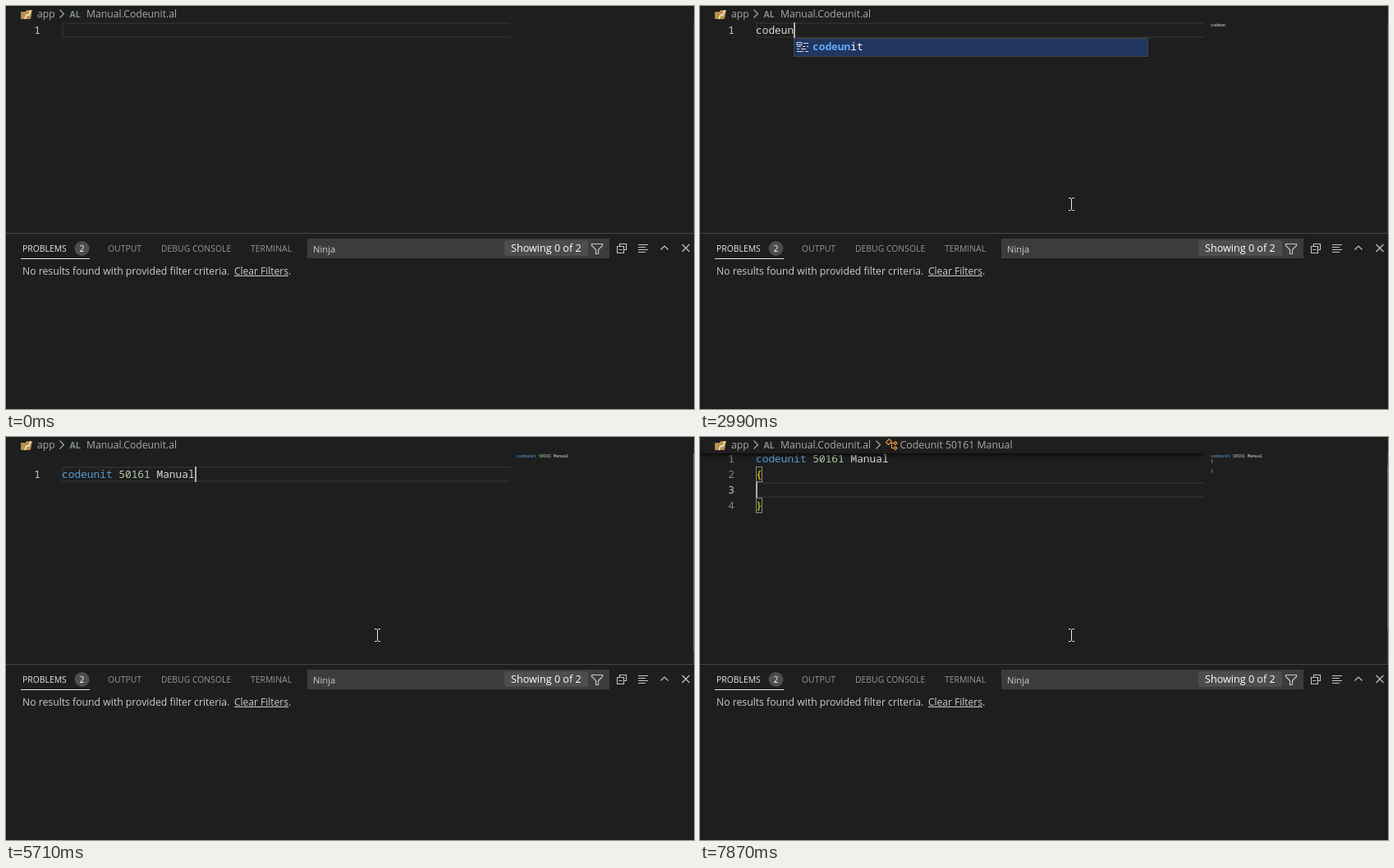
Write an HTML page with a canvas that moves like this. It is 838 px wide and 492 px high and loops after 8000 ms.

```html
<!DOCTYPE html>
<html lang="en">
<head>
<meta charset="utf-8">
<title>Typing a codeunit</title>
<style>
html, body { margin: 0; width: 838px; height: 492px; overflow: hidden; background: #1e1e1e; }
canvas { display: block; }
</style>
</head>
<body>
<canvas id="stage" width="838" height="492"></canvas>
<script>
const ctx = document.getElementById('stage').getContext('2d');
const LOOP = 8000, LEFT = 68, CHAR = 7.698, ROW = 19, TOP = 20, VIEW = 257;
const MONO = '"Noto Sans Mono", "DejaVu Sans Mono", monospace';
const SANS = '"Open Sans", "Noto Sans", sans-serif';
const CODE_FONT = `12.83px ${MONO}`;

const CODE = 'codeunit 50161 Manual';
const KEY_TIMES = [2390, 2490, 2590, 2690, 2790, 2990, 3080, 3170, 3260, 3460, 3520,
  3780, 3980, 4050, 4580, 4930, 5110, 5260, 5260, 5450, 5710];
const LENS = 5710, SPACE = 5980, BRACE = 6200, ENTER = 6400, REFORMAT = 7870;

const between = (t, a, b) => t >= a && t < b;

function rect(x, y, w, h, color) {
  ctx.fillStyle = color;
  ctx.fillRect(x, y, w, h);
}

function text(s, x, y, color, font) {
  ctx.fillStyle = color;
  ctx.font = font;
  ctx.fillText(s, x, y);
}

const label = (s, x, y, color, size = 12.2) => text(s, x, y, color, `${size}px ${SANS}`);

function disc(x, y, r, color) {
  ctx.fillStyle = color;
  ctx.beginPath();
  ctx.arc(x, y, r, 0, 7);
  ctx.fill();
}

function path(d, color, width = 1, fill) {
  const p = new Path2D(d);
  if (fill) { ctx.fillStyle = fill; ctx.fill(p); }
  ctx.strokeStyle = color;
  ctx.lineWidth = width;
  ctx.stroke(p);
}

function editorState(t) {
  const count = KEY_TIMES.filter(k => t >= k).length;
  if (t >= REFORMAT) return { lines: [CODE, '{', '', '}'], row: 2, col: 0 };
  if (t >= ENTER) return { lines: [CODE + ' {', '', '}'], row: 1, col: 4 };
  if (t >= BRACE) return { lines: [CODE + ' {}'], row: 0, col: CODE.length + 2 };
  if (t >= SPACE) return { lines: [CODE + ' '], row: 0, col: CODE.length + 1 };
  return { lines: [CODE.slice(0, count)], row: 0, col: count };
}

function tokenColor(word) {
  if (word === 'codeunit') return '#569cd6';
  if (/\d/.test(word)) return '#b5cea8';
  return /[{}]/.test(word) ? '#ffd700' : '#d4d4d4';
}

function eachToken(line, draw) {
  for (const m of line.matchAll(/codeunit|\d+|[{}]|[^{}\d\s]+/g)) draw(m[0], m.index, tokenColor(m[0]));
}

function drawEditor(t) {
  const { lines, row, col } = editorState(t);
  const lens = t >= LENS ? 16 : 0;
  const scroll = t >= REFORMAT ? ROW : 0;
  const lineTop = i => TOP + lens - scroll + i * ROW;

  ctx.save();
  ctx.beginPath();
  ctx.rect(0, TOP, 838, VIEW);
  ctx.clip();

  ctx.strokeStyle = '#2b2b2b';
  ctx.lineWidth = 2;
  ctx.beginPath();
  ctx.moveTo(614, lineTop(row) + 1);
  ctx.lineTo(LEFT + 1, lineTop(row) + 1);
  ctx.lineTo(LEFT + 1, lineTop(row) + ROW - 1);
  ctx.lineTo(614, lineTop(row) + ROW - 1);
  ctx.stroke();

  lines.forEach((line, i) => {
    const y = lineTop(i);
    text(i + 1, 34.3, y + 14, i === row ? '#c6c6c6' : '#858585', CODE_FONT);
    eachToken(line, (word, at, color) => {
      const x = LEFT + at * CHAR;
      if (/[{}]/.test(word)) {
        rect(x, y, 8, ROW, 'rgba(0,100,0,.1)');
        ctx.strokeStyle = '#888';
        ctx.lineWidth = 1;
        ctx.strokeRect(Math.round(x) + .5, y + .5, 7, ROW - 1);
      }
      text(word, x, y + 14, color, CODE_FONT);
    });
    ctx.globalAlpha = .75;
    eachToken(line, (word, at, color) =>
      text(word, 622 + at * 3, 25 + i * 6, /[{}]/.test(word) ? '#d4d4d4' : color, `bold 5px ${MONO}`));
    ctx.globalAlpha = 1;
  });

  if (!scroll) {
    const alpha = between(t, 5800, 5890) || between(t, 7000, 7070) ? .35
      : between(t, 7070, 7140) ? .7
      : between(t, 5890, 6300) || t >= 7140 ? 1 : 0;
    ctx.globalAlpha = alpha;
    label('0 references', LEFT, 33, '#999', 11.04);
    ctx.globalAlpha = 1;
  }

  if (between(t, 4650, 4930)) {
    path('M183.5 37l2 -2 2 2 2 -2 2 2', '#f14c4c');
    rect(622, 20, 123, 5, 'rgba(255,18,18,.3)');
  }

  const caretOn = t >= 1730 && !between(t, 2190, 2390) && !between(t, 6900, 7400);
  if (caretOn) rect(Math.round(LEFT + col * CHAR), lineTop(row), 2, ROW, '#aeafad');

  // Overview ruler edge and scrollbar slider
  rect(837, TOP, 1, VIEW, 'rgba(127,127,127,.3)');
  if (lens) {
    const ratio = VIEW / (VIEW + lens + (lines.length - 1) * ROW);
    rect(837, TOP + scroll * ratio, 1, VIEW * ratio, 'rgba(140,140,140,.5)');
  }
  if (scroll) {
    const shade = ctx.createLinearGradient(0, TOP, 0, TOP + 6);
    shade.addColorStop(0, 'rgba(0,0,0,.6)');
    shade.addColorStop(1, 'rgba(0,0,0,0)');
    rect(0, TOP, 614, 6, shade);
  }
  ctx.restore();

  if (between(t, KEY_TIMES[0], 3260)) drawSuggestions(col);
}

function drawSuggestions(typed) {
  const x = Math.round(LEFT + typed * CHAR);
  const words = ['codeunit', 'controladdin'].filter(w => w.startsWith(CODE.slice(0, typed)));
  const height = words.length * ROW + 4;
  rect(x, 39, 432, height, '#454545');
  rect(x + 1, 40, 430, height - 2, '#252526');
  rect(x + 1, 40, 430, words.length > 1 ? 20 : 21, '#20365f');
  words.forEach((word, i) => {
    const y = 54 + i * ROW;
    path(`M${x + 4} ${y - 9.5}h6v3h-6zM${x + 12} ${y - 8.5}h6M${x + 4} ${y - 4.5}h5m2 0h3m2 0h2` +
      `M${x + 4} ${y - 1.5}h3m2 0h6M${x + 4} ${y + 1.5}h8m2 0h4`, '#d8d8d8');
    text(word.slice(0, typed), x + 23, y, '#65a9f7', `bold ${CODE_FONT}`);
    text(word.slice(typed), x + 23 + typed * CHAR, y, '#fff', CODE_FONT);
  });
}

function drawBreadcrumbs(t) {
  const gray = '#a9a9a9';
  path('M18.5 7.5h5l2 -2h6l-2 10h-11z', '#b18a45', 1, '#b9924c');
  path('M23 16l2 -5h3l2 -6', '#f0ead8', 1.6);
  label('app', 38, 14, gray);
  path('M65.5 4.5l5 5 -5 5', gray, 1.2);
  text('AL', 77.5, 13.5, '#7f8f8f', `bold 10.5px ${SANS}`);
  label('Manual.Codeunit.al', 98, 14, gray);
  if (t < 6800) return;
  path('M214.5 4.5l5 5 -5 5', gray, 1.2);
  path('M226.5 6.5l4 -4 3 3 -4 4zM232 7.5h4M233.5 7.5v6h2.5M236 7.5l2 -2 2 2 -2 2zM236 13.5l2 -2 2 2 -2 2z', '#dd9140', 1.2);
  label('Codeunit 50161 Manual', 243.5, 14, gray, 12.33);
}

function drawPanel() {
  rect(0, 277, 838, 1, '#474747');
  label('PROBLEMS', 20, 300, '#e7e7e7', 10.4);
  rect(18, 308, 84, 1, '#e7e7e7');
  disc(92.5, 296, 9, '#4d4d4d');
  label('2', 89.5, 300, '#fff', 10.4);
  label('OUTPUT', 124, 300, '#969696', 10.4);
  label('DEBUG CONSOLE', 189, 300, '#969696', 10.4);
  label('TERMINAL', 298, 300, '#969696', 10.4);

  rect(367, 284, 368, 24, '#3c3c3c');
  label('Ninja', 374, 301, '#ccc', 11.2);
  ctx.fillStyle = '#4d4d4d';
  ctx.beginPath();
  ctx.roundRect(607, 286, 102, 19, 2);
  ctx.fill();
  label('Showing 0 of 2', 615, 300, '#fff', 12.6);

  const icon = '#c5c5c5';
  path('M713.5 290.5h13v2l-5 5v5h-3v-5l-5 -5z', icon, 1.2);
  path('M747.5 293v-2.5h8v7h-3M744.5 293.5h8v8h-8zM746.5 297.5h4', icon, 1.1);
  path('M770 291.5h12M770 294.5h9M770 297.5h12M770 300.5h9', icon);
  path('M797.5 297.5l4.5 -4.5 4.5 4.5', icon, 1.2);
  path('M823.5 291l9 9M832.5 291l-9 9', icon, 1.2);

  label('No results found with provided filter criteria.', 20, 328, '#ccc', 12.22);
  label('Clear Filters', 278, 328, '#ccc', 12.02);
  rect(278, 329, 66, 1, '#ccc');
  label('.', 344, 328, '#ccc');
}

function drawPointer(t) {
  if (t < 600) return;
  if (between(t, 1730, 1870)) disc(450, 241, 12, '#87870f');
  if (t >= 800) {
    path('M449 234.5h2.5l1 1 1 -1h2.5M452.5 235v14M449 249.5h2.5l1 -1 1 1h2.5', '#e8e8e8');
    return;
  }
  const k = [0, .35, .75][Math.min(2, Math.floor((t - 600) / 66.7))];
  const x = 727 - 275 * k, y = 444 - 202 * k;
  path(`M${x} ${y}v16l3.6 -3.4 2.6 5.6 2.4 -1 -2.5 -5.5h5z`, '#000', 1, '#fff');
}

function frame() {
  const t = performance.now() % LOOP;
  rect(0, 0, 838, 492, '#1e1e1e');
  drawEditor(t);
  drawBreadcrumbs(t);
  drawPanel();
  drawPointer(t);
  requestAnimationFrame(frame);
}
frame();
</script>
</body>
</html>
```
